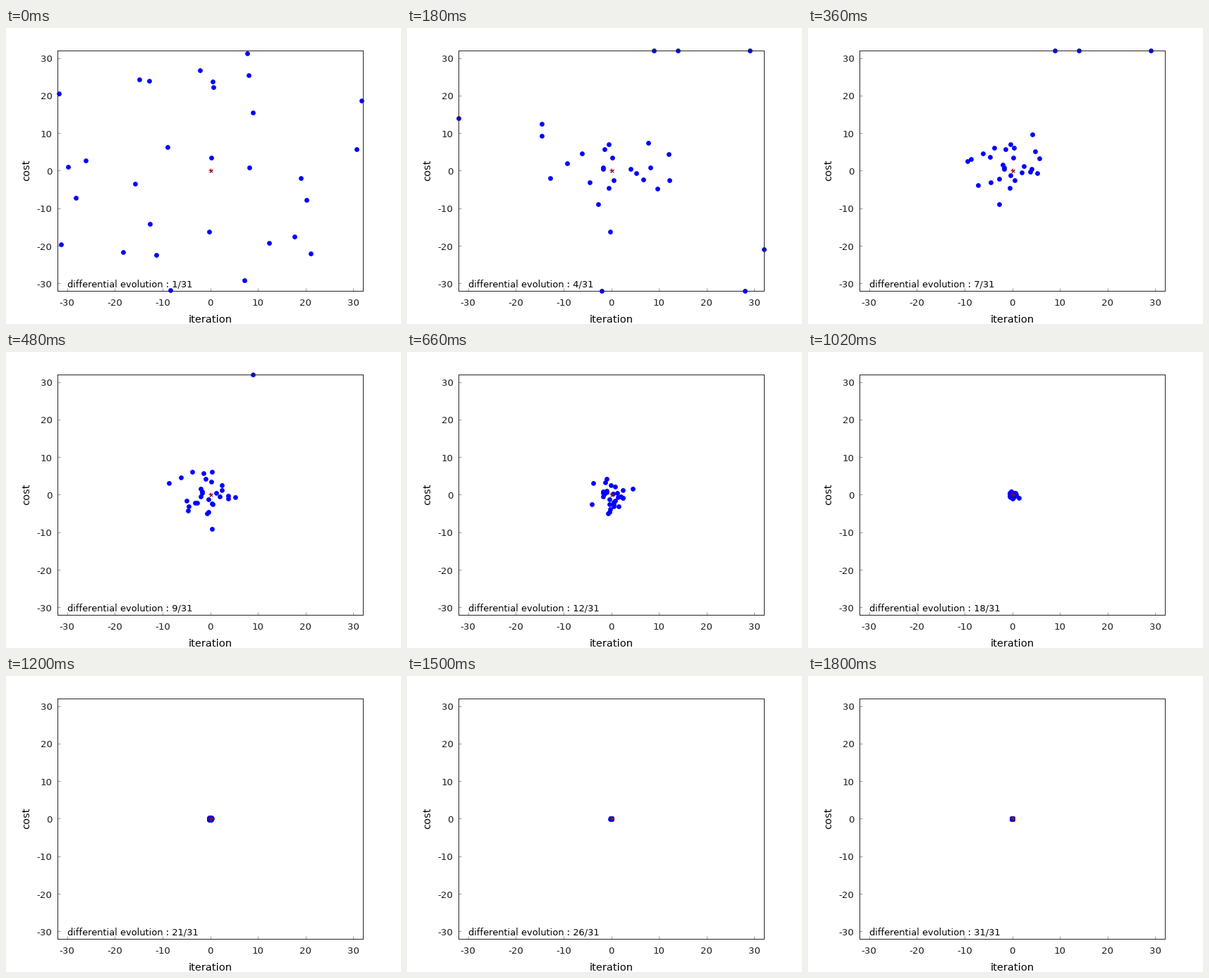
Animation of 560x420 px, one loop 1860 ms. Source, as a matplotlib script:

```python
import numpy as np
import matplotlib.pyplot as plt
from matplotlib.animation import FuncAnimation

W, H, DPI = 560, 420, 80
PX = 72 / DPI  # points per pixel
GENS, STEP, SIZE, LIMIT = 31, 60, 30, 32
INK = "#262626"

plt.rcParams.update({"font.family": "DejaVu Sans", "axes.unicode_minus": False,
                     "text.hinting": "default"})

# Members thrown against the bounds early on; the first one lasts longest.
STRAYS = np.array([(9, 32), (29, 32), (14, 32), (28, -32),
                   (-2, -32), (32, -21), (-32, 14)])


def spread(g):
    """Width of the population, falling about exponentially."""
    return np.exp(np.interp(g, [1, 4, 9, 15, 19, 21, 26, 31],
                            np.log([18, 8, 4.5, 1.2, .35, .16, .08, .015])))


def evolve(seed=7):
    """Members far from the optimum get replaced, the better ones stay."""
    rng = np.random.default_rng(seed)
    pop = rng.uniform(-LIMIT, LIMIT, (SIZE, 2))
    history = [pop]
    for g in range(2, GENS + 1):
        s = spread(g)
        r = np.hypot(*pop.T) / s
        weak = (r > 2.2) | ((r > .8) & (rng.random(SIZE) < .3))
        trial = np.clip(rng.normal(0, s, (SIZE, 2)), -LIMIT, LIMIT)
        pop = np.where(weak[:, None], trial, pop)
        shown = pop.copy()
        n = int(np.interp(g, [1, 4, 9, 10, 11], [0, 7, 1, 1, 0]))
        shown[:n] = STRAYS[:n]
        history.append(shown)
    return history


history = evolve()

fig = plt.figure(figsize=(W / DPI, H / DPI), dpi=DPI, facecolor="white")
ax = fig.add_axes([73 / W, 1 - 373 / H, 433 / W, 341 / H])
ax.set(xlim=(-LIMIT, LIMIT), ylim=(-LIMIT, LIMIT),
       xticks=range(-30, 31, 10), yticks=range(-30, 31, 10))
ax.tick_params(direction="in", length=4.3 * PX, width=.7 * PX, color="#707070",
               labelcolor=INK, labelsize=13.33 * PX)
ax.tick_params(axis="x", pad=10.5 * PX)
ax.tick_params(axis="y", pad=7.5 * PX)
for spine in ax.spines.values():
    spine.set(linewidth=PX, color=INK)


def label(x, y, s, **kw):
    fig.text(x / W, 1 - y / H, s, size=14.67 * PX, ha="center",
             va="baseline", rotation_mode="anchor", **kw)


label(290, 418.5, "iteration")
label(33.5, 202, "cost", rotation=90)

dots, = ax.plot([], [], "o", color="blue", ms=6.8 * PX, mew=0, clip_on=False)
ax.plot(0, 0, "x", color="#500030", ms=5 * PX, mew=.9 * PX, zorder=3)
ax.plot(0, 0, "+", color="#c00010", ms=6 * PX, mew=PX, zorder=3)
counter = ax.text(-30, -31.05, "", size=13 * PX, color="black", va="baseline")


def draw(i):
    dots.set_data(*history[i].T)
    counter.set_text(f"differential evolution : {i + 1}/{GENS}")
    return dots, counter


anim = FuncAnimation(fig, draw, frames=GENS, interval=STEP,
                     repeat=True, repeat_delay=0)
plt.show()
```
